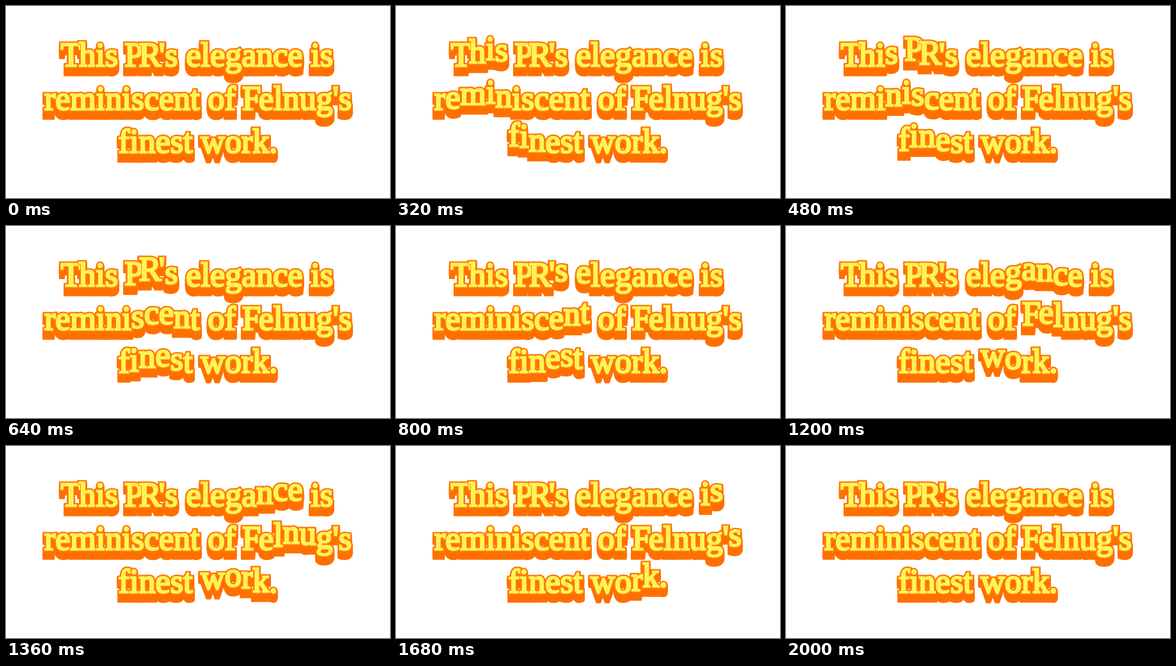
An HTML page with a canvas for the animation above (3200 ms loop, 600 px wide and 300 px high).

```html
<!DOCTYPE html>
<html lang="en">
<head>
<meta charset="utf-8">
<title>Praise</title>
<style>
  html, body { margin: 0; width: 100%; height: 100%; overflow: hidden; background: #fff; }
  canvas { display: block; }
</style>
</head>
<body>
<canvas id="stage" width="600" height="300"></canvas>
<script>
const LOOP = 3200, STEP = 80, WAVE_END = 2000;
const SWEEP = 1470;   // ms for the crest to cross one line
const REACH = 2.4;    // half width of the wave, in characters
const LIFT = 10, DEPTH = 12;
const FIRST_BASELINE = 94, LINE_HEIGHT = 67.5;
const CAPITAL_TIGHTNESS = 0.8;
const YELLOW = "#fff454", OUTLINE = "#ff780c", SIDE = "#ff7000";
const FACE_WIDTH = 2.8, DIVIDER_WIDTH = 4.6, OUTLINE_WIDTH = 7.5;

const ctx = document.getElementById("stage").getContext("2d");
ctx.font = "52px 'Liberation Serif', 'Times New Roman', serif";
ctx.textAlign = "center";
ctx.lineJoin = "miter";
ctx.miterLimit = 2;   // squares off the slab serifs

const advance = char =>
  ctx.measureText(char).width * (/[A-Z]/.test(char) ? CAPITAL_TIGHTNESS : 1);

function layOut(text, row) {
  const chars = [...text];
  const width = chars.reduce((sum, char) => sum + advance(char), 0);
  let left = 300 - width / 2;
  return chars.map((char, index) => {
    const x = left + advance(char) / 2;
    left += advance(char);
    return { char, index, last: chars.length - 1, x, y: FIRST_BASELINE + row * LINE_HEIGHT };
  });
}

const letters = ["This PR's elegance is", "reminiscent of Felnug's", "finest work."].flatMap(layOut);

function rise({ index, last }, time) {
  if (time >= WAVE_END) return 0;
  const crest = -2.1 + last * time / SWEEP;
  const distance = Math.abs(index - crest) / REACH;
  return distance < 1 ? Math.round(LIFT * Math.cos(distance * Math.PI / 2) ** 2) : 0;
}

function drawLetter(letter, time, color, lineWidth, drop = 0) {
  const y = letter.y - rise(letter, time) + drop;
  ctx.fillStyle = ctx.strokeStyle = color;
  ctx.lineWidth = lineWidth;
  ctx.strokeText(letter.char, letter.x, y);
  ctx.fillText(letter.char, letter.x, y);
}

function draw(time) {
  ctx.clearRect(0, 0, 600, 300);
  for (let drop = DEPTH; drop > 0; drop--) {
    for (const letter of letters) drawLetter(letter, time, SIDE, OUTLINE_WIDTH, drop);
  }
  for (const letter of letters) drawLetter(letter, time, OUTLINE, OUTLINE_WIDTH);
  for (const letter of letters) {
    drawLetter(letter, time, OUTLINE, DIVIDER_WIDTH);
    drawLetter(letter, time, YELLOW, FACE_WIDTH);
  }
}

const start = performance.now();
let shown = -1;
function tick() {
  const elapsed = (performance.now() - start) % LOOP;
  const time = Math.min(Math.floor(elapsed / STEP) * STEP, WAVE_END);
  if (time !== shown) draw(shown = time);
  requestAnimationFrame(tick);
}
tick();
</script>
</body>
</html>
```
